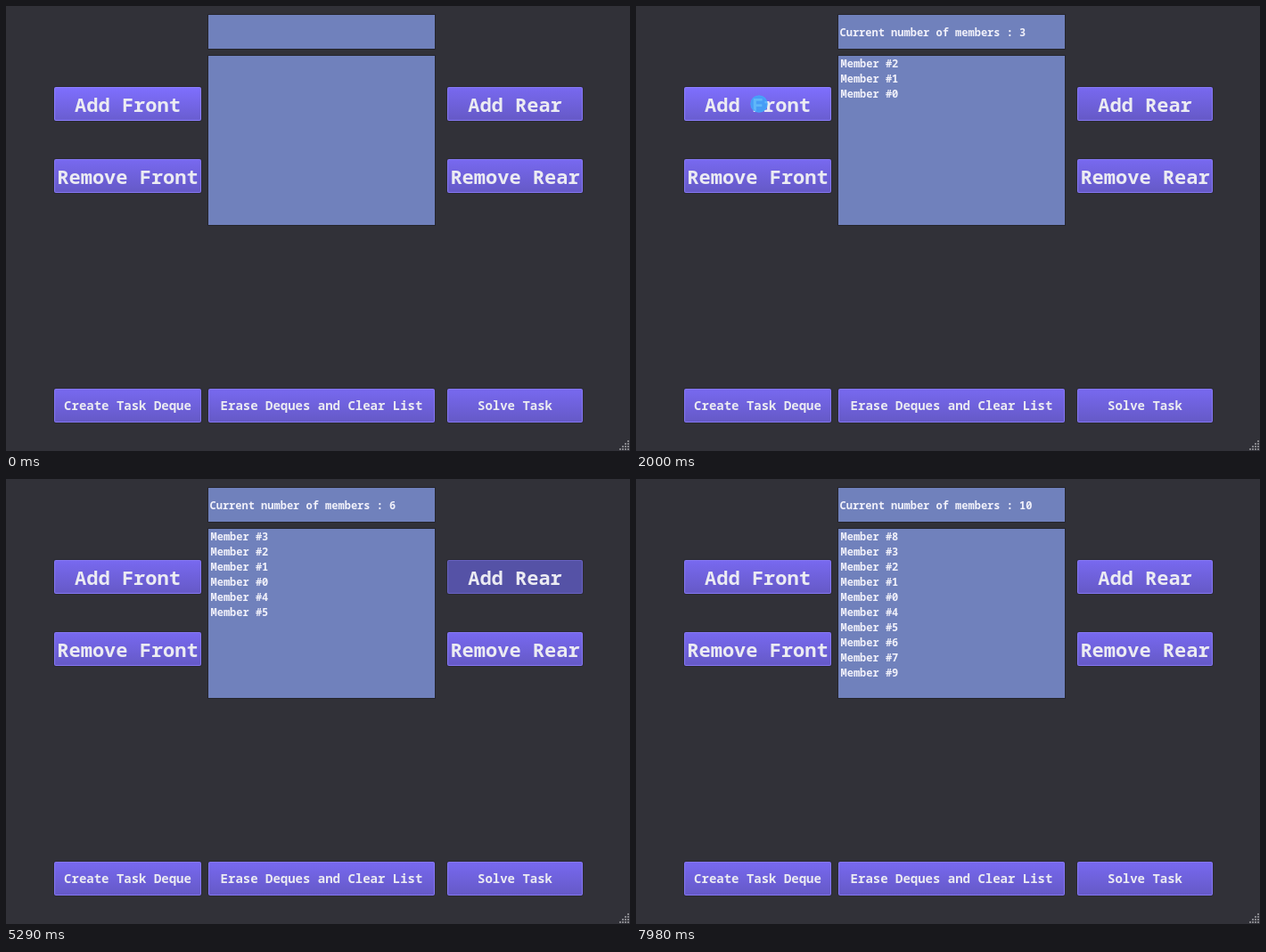
These frames come from a looping animation (700 by 500 pixels, 8000 ms). An HTML page with a canvas:

```html
<!DOCTYPE html>
<html lang="en">
<head>
<meta charset="utf-8">
<title>Deque demo</title>
<style>
html, body { margin: 0; width: 100%; height: 100%; overflow: hidden; background: #313138; }
canvas { display: block; }
</style>
</head>
<body>
<canvas id="stage" width="700" height="500"></canvas>
<script>
const ctx = document.getElementById('stage').getContext('2d');
const LOOP = 8000, RELEASE = 100, RIPPLE_START = 40, RIPPLE_END = 500;

const buttons = [
  { id: 'front', label: 'Add Front', x: 54, y: 91, w: 165, size: 22 },
  { id: 'rear', label: 'Add Rear', x: 495, y: 91, w: 152, size: 22 },
  { label: 'Remove Front', x: 54, y: 172, w: 165, size: 22 },
  { label: 'Remove Rear', x: 495, y: 172, w: 152, size: 22 },
  { label: 'Create Task Deque', x: 54, y: 430, w: 165, size: 14 },
  { label: 'Erase Deques and Clear List', x: 227, y: 430, w: 254, size: 14 },
  { label: 'Solve Task', x: 495, y: 430, w: 152, size: 14 },
];

const clicks = [
  [400, 'front'], [1160, 'front'], [1850, 'front'], [2630, 'front'],
  [3740, 'rear'], [4490, 'rear'], [5290, 'rear'], [6090, 'rear'],
  [6740, 'front'], [7480, 'rear'],
].map(([time, side]) => ({ time, side }));

const hovers = {
  front: [[0, 3280], [6590, 7230]],
  rear: [[3640, 6540], [7280, 7980]],
};
const pointer = { front: [138, 110], rear: [560, 124] };

// Gradient top, gradient bottom, border
const styles = {
  normal: ['#7869f0', '#6559c6', '#8577f2'],
  hover: ['#7f6fff', '#695dcf', '#8c7eff'],
  pressed: ['#5552a6', '#5552a6', '#6861c0'],
};

function text(string, x, y, size, align = 'left', color = '#f1f1fa') {
  ctx.font = `bold ${size}px "Noto Sans Mono", monospace`;
  ctx.textAlign = align;
  ctx.fillStyle = color;
  ctx.fillText(string, x, y);
}

function box(x, y, w, h, radius, fill) {
  ctx.fillStyle = fill;
  ctx.beginPath();
  ctx.roundRect(x, y, w, h, radius);
  ctx.fill();
}

function panel(y, h) {
  box(226, y - 1, 256, h + 2, 1, '#25252c');
  box(227, y, 254, h, 0, '#7081bc');
}

function buttonState(id, t) {
  if (clicks.some(c => c.side === id && t >= c.time && t < c.time + RELEASE)) return 'pressed';
  const hovered = (hovers[id] || []).some(([from, to]) => t >= from && t < to);
  return hovered ? 'hover' : 'normal';
}

function drawButton({ id, label, x, y, w, size }, t) {
  const [top, bottom, border] = styles[buttonState(id, t)];
  const fill = ctx.createLinearGradient(0, y, 0, y + 38);
  fill.addColorStop(0, top);
  fill.addColorStop(1, bottom);
  box(x - 1, y - 1, w + 2, 40, 3, '#2a2a32');
  box(x, y, w, 38, 2, border);
  box(x + 1, y + 1, w - 2, 36, 1, fill);
  text(label, x + w / 2, y + (size > 20 ? 28 : 24), size, 'center', '#ebebf2');
}

function drawRipple({ time, side }, t) {
  const age = t - time;
  if (age < RIPPLE_START || age >= RIPPLE_END) return;
  const p = (age - RIPPLE_START) / (RIPPLE_END - RIPPLE_START);
  ctx.beginPath();
  ctx.arc(...pointer[side], 7 + 9 * p, 0, 2 * Math.PI);
  ctx.fillStyle = `rgba(60, 170, 250, ${age < 200 ? 0.8 : Math.max(0, 0.8 - (age - 200) / 100)})`;
  ctx.fill();
  ctx.strokeStyle = `rgba(70, 165, 250, ${Math.min(0.9, 2 * (1 - p))})`;
  ctx.lineWidth = 1.2;
  ctx.stroke();
}

function drawGrip() {
  ctx.fillStyle = '#85858a';
  for (let row = 0; row < 4; row++)
    for (let col = 0; col <= row; col++)
      ctx.fillRect(697 - 3 * col, 488 + 3 * row, 2, 2);
}

function draw(t) {
  box(0, 0, 700, 500, 0, '#313138');
  panel(10, 38);
  panel(56, 190);

  const members = [];
  clicks.forEach((c, i) => {
    if (t < c.time + RELEASE) return;
    members[c.side === 'front' ? 'unshift' : 'push'](`Member #${i}`);
  });
  if (members.length) text(`Current number of members : ${members.length}`, 228.5, 34, 12);
  members.forEach((name, row) => text(name, 229.5, 69 + 17 * row, 12));

  buttons.forEach(b => drawButton(b, t));
  clicks.forEach(c => drawRipple(c, t));
  drawGrip();
}

const start = performance.now();
function frame() {
  draw((performance.now() - start) % LOOP);
  requestAnimationFrame(frame);
}
frame();
</script>
</body>
</html>
```
